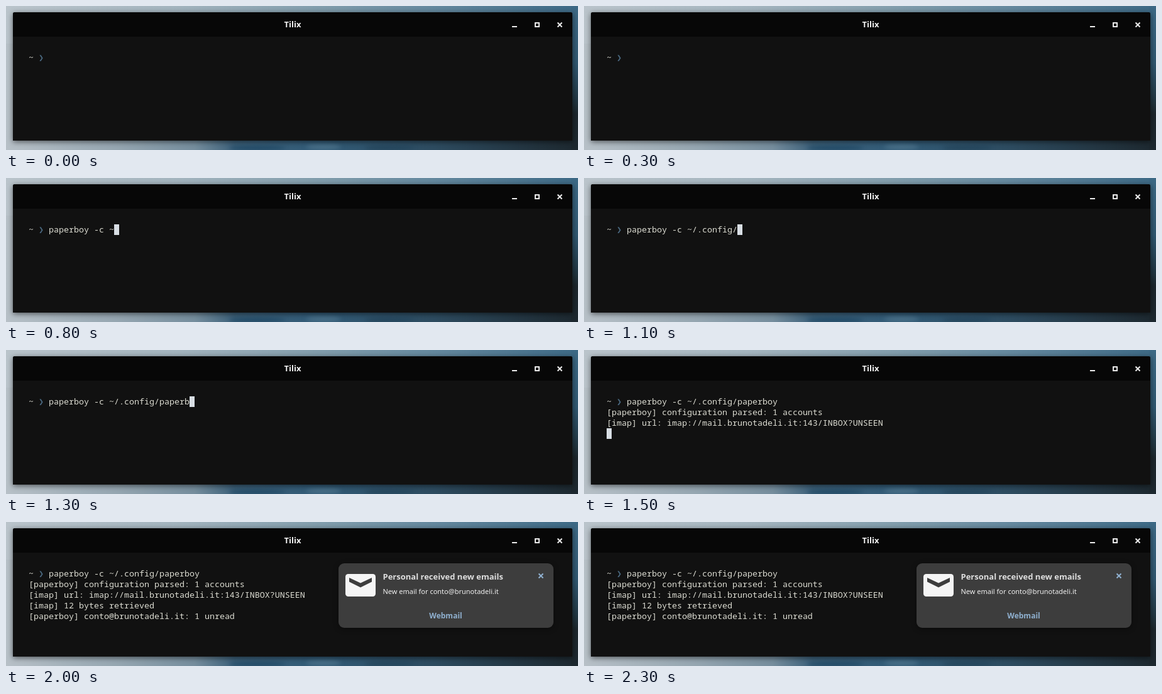
These frames come from a looping animation (910 px wide and 230 px high, 2.4 s). An HTML page:

```html
<!DOCTYPE html>
<html lang="en">
<head>
<meta charset="utf-8">
<title>Terminal mail check</title>
<style>
  html, body { margin: 0; width: 100%; height: 100%; overflow: hidden; background: #26343f; }
  svg { display: block; }
  .ui { font-family: "Noto Sans", sans-serif; }
  .bold { font-weight: 700; }
  .mono { font: 13.333px "Noto Sans Mono", monospace; fill: #dcdcd2; white-space: pre; }
  .chevron { font: 13.333px "DejaVu Sans Mono", monospace; fill: #4b6a82; }
  .window { filter: drop-shadow(0 2px 4px rgba(0, 0, 0, .55)); }
  .card { filter: drop-shadow(0 2px 4px rgba(0, 0, 0, .4)); }
  .blur { filter: blur(3px); }
</style>
</head>
<body>
<svg width="910" height="230" viewBox="0 0 910 230">
  <defs>
    <linearGradient id="sky">
      <stop offset="0" stop-color="#bac4cb"/>
      <stop offset=".3" stop-color="#a3b4be"/>
      <stop offset=".55" stop-color="#819dac"/>
      <stop offset=".75" stop-color="#64889e"/>
      <stop offset="1" stop-color="#3d6985"/>
    </linearGradient>
    <linearGradient id="sea">
      <stop offset="0" stop-color="#b7c0c7"/>
      <stop offset=".2" stop-color="#94a5b0"/>
      <stop offset=".33" stop-color="#758d9d"/>
      <stop offset=".4" stop-color="#3c6079"/>
      <stop offset=".55" stop-color="#315a76"/>
      <stop offset=".75" stop-color="#2d4b5f"/>
      <stop offset="1" stop-color="#1d282f"/>
    </linearGradient>
    <linearGradient id="side" x2="0" y2="1">
      <stop offset="0" stop-color="#3d6985"/>
      <stop offset=".4" stop-color="#2f566f"/>
      <stop offset=".65" stop-color="#213642"/>
      <stop offset=".75" stop-color="#1c262c"/>
      <stop offset="1" stop-color="#1d282f"/>
    </linearGradient>
  </defs>

  <!-- wallpaper -->
  <rect width="910" height="230" fill="url(#sea)"/>
  <rect width="910" height="60" fill="url(#sky)"/>
  <rect x="899" width="11" height="230" fill="url(#side)"/>
  <g class="blur">
    <ellipse cx="400" cy="227" rx="45" ry="4" fill="#234b67"/>
    <ellipse cx="505" cy="225" rx="28" ry="4" fill="#4a7088"/>
    <ellipse cx="610" cy="227" rx="40" ry="4" fill="#25465c"/>
  </g>

  <!-- window -->
  <g class="window">
    <path d="M11 215V13q0-3 3-3H898q3 0 3 3V215z" fill="#111"/>
    <path d="M11 49V13q0-3 3-3H898q3 0 3 3V49z" fill="#070707"/>
  </g>
  <text class="ui bold" x="456" y="34" font-size="13" text-anchor="middle" fill="#f0f0f0">Tilix</text>
  <g fill="none" stroke="#ececec" stroke-width="2">
    <path d="M805 33h8"/>
    <rect x="842" y="27" width="6" height="6"/>
    <path d="M877.5 26.5l7 7m0-7l-7 7"/>
  </g>

  <!-- terminal -->
  <text class="mono" x="36" y="87">~</text>
  <text class="chevron" x="52" y="87">❯</text>
  <text class="mono" x="68" y="87" id="command"></text>
  <g class="mono" id="request">
    <text x="36" y="104">[paperboy] configuration parsed: 1 accounts</text>
    <text x="36" y="121">[imap] url: imap://mail.brunotadeli.it:143/INBOX?UNSEEN</text>
  </g>
  <g class="mono" id="reply">
    <text x="36" y="138">[imap] 12 bytes retrieved</text>
    <text x="36" y="155">[paperboy] conto@brunotadeli.it: 1 unread</text>
  </g>
  <rect id="cursor" width="8" height="17" fill="#d8dee4"/>

  <!-- notification -->
  <g id="notice">
    <rect class="card" x="529" y="66" width="342" height="103" rx="9" fill="#3d3d3d"/>
    <rect x="540" y="83" width="48" height="36" rx="4.5" fill="#f5f5f5"/>
    <path d="M546 89l18 8.500 18-8.500v6.500l-18 9-18-9z" fill="#3d3d3d"/>
    <g class="ui">
      <text class="bold" x="599.5" y="92" font-size="13" fill="#dedede">Personal received new emails</text>
      <text x="599.5" y="115" font-size="11" fill="#f0f0f0">New email for conto@brunotadeli.it</text>
      <text class="bold" x="699.5" y="154" font-size="12" text-anchor="middle" fill="#8fb0cf">Webmail</text>
    </g>
    <path d="M847.500 82.500l7 7m0-7l-7 7" stroke="#8fb0cf" stroke-width="2"/>
  </g>
</svg>
<script>
  const LOOP = 2400, CELL = 8, ROW = 17;
  const COMMAND = "paperboy -c ~/.config/paperboy";
  const el = id => document.getElementById(id);
  const [command, request, reply, notice, cursor] =
    ["command", "request", "reply", "notice", "cursor"].map(el);
  const show = (node, on) => node.setAttribute("visibility", on ? "visible" : "hidden");
  const within = (t, from, to) => t >= from && t < to;

  // One character at 400 ms, then three more every 100 ms.
  function typedAt(t) {
    const count = t < 400 ? 0 : 1 + 3 * Math.floor((t - 400) / 100);
    return COMMAND.slice(0, count);
  }

  function draw(t) {
    const typed = typedAt(t);
    const sent = t >= 1500, done = t >= 1600;
    const row = done ? 5 : sent ? 3 : 0;
    const column = sent ? 0 : 4 + typed.length;

    command.textContent = typed;
    show(request, sent);
    show(reply, done);
    show(notice, done);
    cursor.setAttribute("x", 36 + column * CELL);
    cursor.setAttribute("y", 74 + row * ROW);
    show(cursor, within(t, 100, 300) || within(t, 400, 1600) ||
      within(t, 1800, 2000) || within(t, 2100, 2300));
  }

  function tick() {
    draw(performance.now() % LOOP);
    requestAnimationFrame(tick);
  }
  tick();
</script>
</body>
</html>
```
